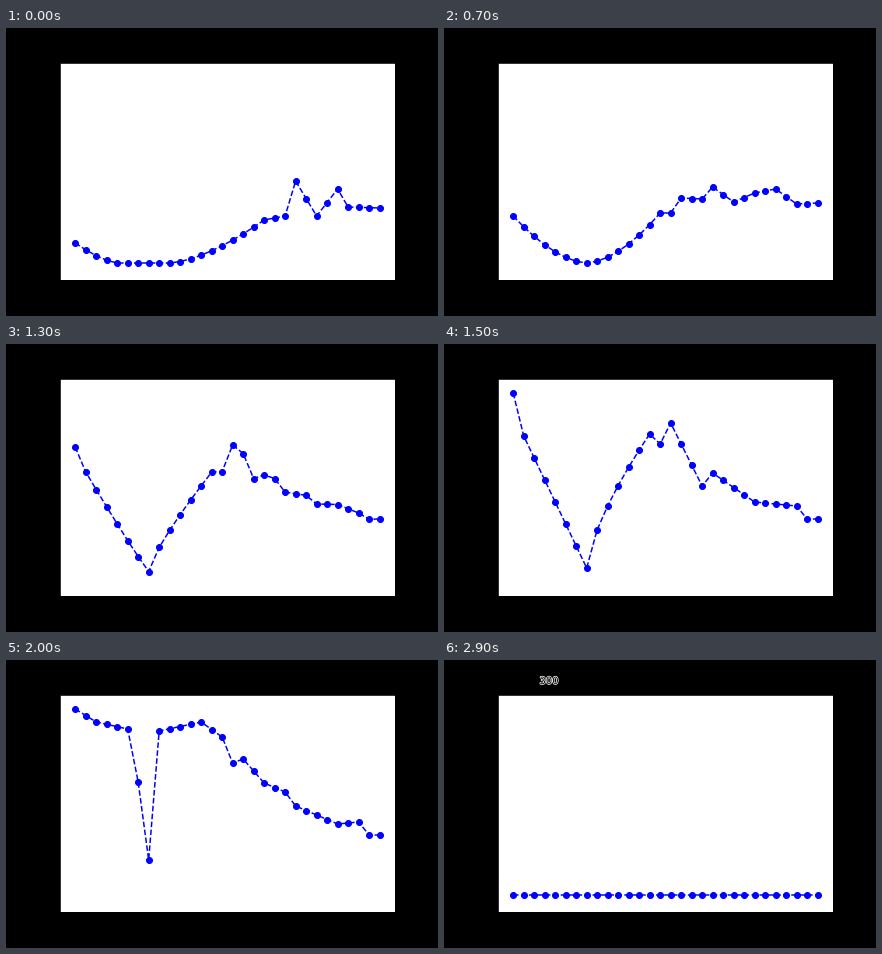
These frames come from a looping animation (432 by 288 pixels, 3 s). A matplotlib script:

```python
import numpy as np
import matplotlib.pyplot as plt
import matplotlib.patheffects as pe
from matplotlib.animation import FuncAnimation

W, H, DPI = 432, 288, 72
FRAMES, INTERVAL = 30, 100
N = 30
LEFT, TOP, RIGHT, BOTTOM = 54, 35, 388.8, 252
FLOOR = 235  # stage height of the zero level, measured from the top

index = np.arange(N)


def bend(y, foot, crest, power):
    """Curve the slope between two (index, height) points as a power law."""
    (i0, y0), (i1, y1) = foot, crest
    t = (index - i0) / (i1 - i0)
    on = (t >= 0) & (t <= 1)
    y[on] = y0 + (y1 - y0) * t[on] ** power


def pose(left, dip, right, powers):
    """Left ridge, flat dip and right ridge, joined by two bent flanks."""
    first, last, depth = dip
    feet = (first, depth), (last, depth)
    y = np.interp(index, *zip(*left, *feet, *right))
    bend(y, feet[0], left[-1], powers[0])
    bend(y, feet[1], right[0], powers[1])
    return y


tail = [(25, 74), (27, 59), (29, 60)]
shelf = [(27, 73), (28, 60), (29, 60)]

start = pose([(0, 20)], (4, 9, 0),
             [(18, 43), (20, 47), (21, 82), (23, 47), (25, 74), (26, 56),
              (29, 55)], (1.45, 1.55))
early = pose([(0, 27)], (5, 9, 0),
             [(17, 49), (18, 48), (19, 66), (20, 55), (22, 80), (23, 62)]
             + tail, (1.5, 1.25))
valley = pose([(0, 47)], (7, 7, 0),
              [(14, 50), (15, 50), (16, 65), (18, 64), (19, 76), (21, 61),
               (23, 70)] + tail, (1.7, 1.72))
climb = pose([(0, 78), (1, 71)], (7, 7, 4),
             [(14, 80), (15, 112), (16, 116), (17, 87), (18, 115), (20, 75),
              (22, 83), (23, 73)] + tail, (1.2, 1.05))
peak = pose([(0, 186), (1, 143)], (7, 7, 11),
            [(13, 145), (14, 135), (15, 156), (18, 93), (19, 106), (23, 77)]
            + shelf, (1, 0.7))
notch = pose([(0, 186), (2, 173), (5, 166)], (7, 7, 35),
             [(8, 164), (12, 173), (14, 158), (15, 132), (16, 136), (18, 112),
              (20, 103), (21, 89), (25, 71)] + shelf, (0.75, 1))

# Collapse: the ends reach the floor first, the middle follows.
window = np.clip(np.sin(np.pi * index / 27), 0, 1)
sinking = 0.6 * window * notch
flat = np.zeros(N)

key_times = [0, 3, 7, 11, 15, 20, 23, 24, 28]
poses = np.array([start, early, valley, climb, peak, notch, notch,
                  sinking, flat])


def heights(frame):
    return [np.interp(frame, key_times, track) for track in poses.T]


fig = plt.figure(figsize=(W / DPI, H / DPI), dpi=DPI, facecolor="black")
ax = fig.add_axes([LEFT / W, 1 - BOTTOM / H,
                   (RIGHT - LEFT) / W, (BOTTOM - TOP) / H])
ax.set_xlim(LEFT, RIGHT)
ax.set_ylim(FLOOR - BOTTOM, FLOOR - TOP)
ax.set_xticks([])
ax.set_yticks([])

line, = ax.plot(np.linspace(69.22, 373.58, N), start, "bo--", lw=1.5, ms=6)

label = fig.text(95.5 / W, 1 - 24 / H, "300", fontsize=10, color="black",
                 family="DejaVu Sans", visible=False)
label.set_path_effects([pe.withStroke(linewidth=1.4, foreground="white")])


def update(frame):
    line.set_ydata(heights(frame))
    label.set_visible(frame == FRAMES - 1)
    return line, label


anim = FuncAnimation(fig, update, frames=FRAMES, interval=INTERVAL,
                     repeat=True, repeat_delay=0, blit=False)
plt.show()
```
